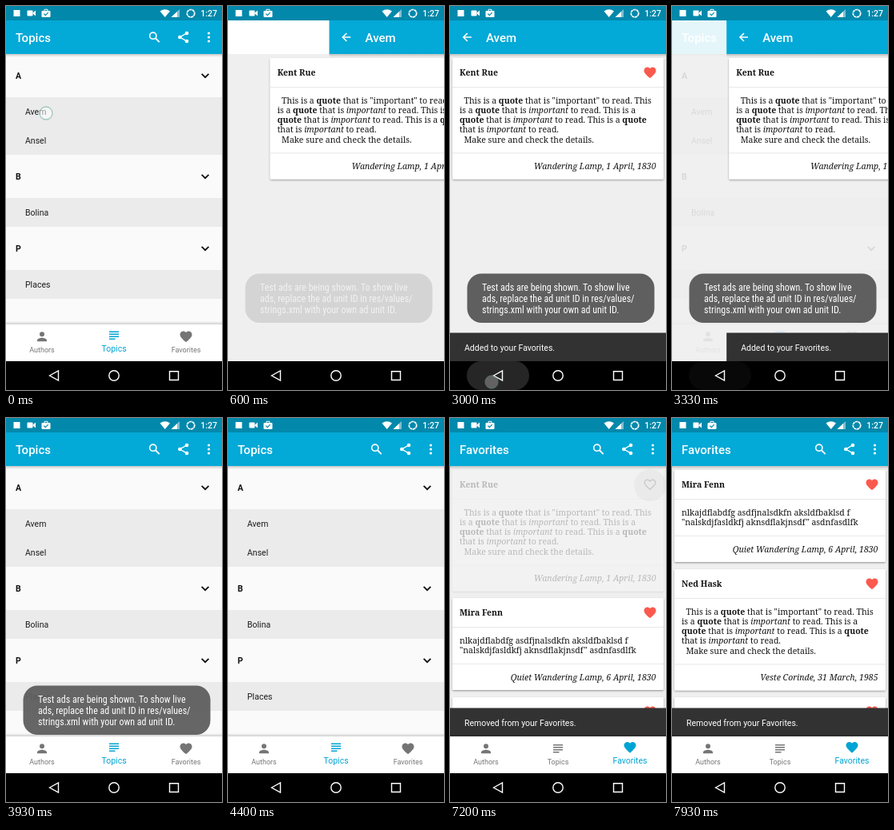
Animation, 270 px wide and 480 px high, one loop 8 s. Source, as an HTML page:

```html
<!DOCTYPE html>
<html lang="en">
<head>
<meta charset="utf-8">
<title>Quotes app</title>
<style>
html, body { margin: 0; width: 100%; height: 100%; overflow: hidden; background: #000; }
svg { display: block; width: 270px; height: 480px; }
text { font-family: Roboto, sans-serif; font-size: 10.5px; white-space: pre; }
.title { font-size: 15px; font-weight: 500; fill: #fff; }
.clock { font-weight: 500; fill: #fff; }
.serif { font-family: "Noto Serif", serif; fill: #151515; }
.bold { font-weight: 700; }
.ital { font-style: italic; }
.end { text-anchor: end; }
.mid { text-anchor: middle; }
.toast { font-family: "Roboto Condensed", Roboto, sans-serif; font-size: 12px; fill: #fff; }
.line { fill: none; stroke-linecap: square; }
</style>
</head>
<body>
<svg id="stage" viewBox="0 0 270 480" xmlns="http://www.w3.org/2000/svg"></svg>
<script>
const LOOP = 8000, BLUE = '#03a9d7', GREY = [117, 117, 117], ACTIVE = [0, 164, 212];
const HEART = 'M12 21.35l-1.45-1.32C5.4 15.36 2 12.28 2 8.5 2 5.42 4.42 3 7.5 3c1.74 0 3.41.81 4.5 2.09C13.09 3.81 14.76 3 16.5 3 19.58 3 22 5.42 22 8.5c0 3.78-3.4 6.86-8.55 11.54z';
const HOLLOW = HEART + 'M12.1 18.55l-.1.1-.1-.1C7.14 14.24 4 11.39 4 8.5 4 6.5 5.5 5 7.5 5c1.54 0 3.04.99 3.57 2.36h1.87C13.46 5.99 14.96 5 16.5 5c2 0 3.5 1.5 3.5 3.5 0 2.89-3.14 5.74-7.9 10.05z';
const PERSON = 'M12 12a4 4 0 1 0 0-8 4 4 0 0 0 0 8zm0 2c-2.67 0-8 1.34-8 4v2h16v-2c0-2.66-5.33-4-8-4z';
const SUBJECT = 'M14 17H4v2h10zM20 9H4v2h16zM4 15h16v-2H4zM4 5v2h16V5z';

// ---- markup helpers
const rect = (x, y, w, h, fill, more = '') => `<rect x="${x}" y="${y}" width="${w}" height="${h}" fill="${fill}" ${more}/>`;
const text = (x, y, s, cls = '', more = '') => `<text x="${x}" y="${y}" class="${cls}" ${more}>${s}</text>`;
const group = (id, body, more = '') => `<g id="${id}" ${more}>${body}</g>`;
const icon = (d, x, y, more = '') => `<path d="${d}" transform="translate(${x - 9} ${y - 9}) scale(.75)" ${more}/>`;
const stroke = (d, color, w) => `<path class="line" d="${d}" stroke="${color}" stroke-width="${w}"/>`;
const rich = s => s.replace(/\*(.+?)\*/g, '<tspan class="bold">$1</tspan>').replace(/_(.+?)_/g, '<tspan class="ital">$1</tspan>');

const QUOTE = [
  '  This is a *quote* that is "important" to read. This',
  'is a *quote* that is _important_ to read. This is a',
  '*quote* that is _important_ to read. This is a *quote*',
  'that is _important_ to read.',
  '  Make sure and check the details.'
];
const SCRIBBLE = ['nlkajdflabdfg asdfjnalsdkfn aksldfbaklsd f', '"nalskdjfasldkfj aknsdflakjnsdf" asdnfasdlfk'];

function card(id, y, name, lines, source) {
  const h = 90.5 + lines.length * 12.2, foot = y + h - 33;
  return group(id,
    rect(3, y, 264, h, '#fff', 'rx="1.5" filter="url(#lift)"') +
    rect(3, y + 36, 264, .8, '#e2e2e2') + rect(3, foot, 264, .8, '#e2e2e2') +
    text(12, y + 22, name, 'serif bold') +
    lines.map((s, i) => text(12, y + 56.5 + i * 12.25, rich(s), 'serif')).join('') +
    text(257.5, y + h - 12.3, source, 'serif ital end') +
    icon(HEART, 250, y + 18.3, 'class="full" fill="#fb594d"') +
    icon(HOLLOW, 250, y + 18.3, 'class="open" fill="#7d7d7d" fill-rule="evenodd"'));
}

const toolbar = rect(0, 18, 270, 42, BLUE) + rect(0, 60, 270, 4, 'url(#down)');

const actions =
  `<circle cx="183.8" cy="37.2" r="4.1" fill="none" stroke="#fff" stroke-width="1.6"/>` +
  stroke('M187.3 40.7L191 44.4', '#fff', 1.9) + stroke('M226 34L217.3 39L226 44', '#fff', 1.4) +
  [[217.3, 39], [226, 34], [226, 44]].map(([x, y]) => `<circle cx="${x}" cy="${y}" r="2.3" fill="#fff"/>`).join('') +
  [34, 39, 44].map(y => `<circle cx="253.5" cy="${y}" r="1.6" fill="#fff"/>`).join('');

const section = (y, s) => text(12, y + 31, s, 'bold', 'fill="#111"') + stroke(`M245.2 ${y + 25.4}l3.8 3.8l3.8 -3.8`, '#111', 1.7);
const row = (y, s) => rect(0, y, 270, 36, '#ebebeb') + text(24, y + 22, s, '', 'fill="#1c1c1c"');

const topics = rect(0, 60, 270, 340, '#fafafa') +
  section(60, 'A') + row(114, 'Avem') + row(150, 'Ansel') +
  section(186, 'B') + row(240, 'Bolina') + section(276, 'P') + row(330, 'Places') +
  `<g clip-path="url(#rowClip)"><circle id="rowRipple" cx="50" cy="134"/></g>`;

const favorites = rect(0, 60, 270, 340, '#efefef') +
  card('fav0', 65, 'Kent Rue', QUOTE, 'Wandering Lamp, 1 April, 1830') +
  group('rest',
    card('fav1', 225, 'Mira Fenn', SCRIBBLE, 'Quiet Wandering Lamp, 6 April, 1830') +
    card('fav2', 349, 'Ned Hask', QUOTE, 'Veste Corinde, 31 March, 1985') +
    card('fav3', 509, 'Ned Hask', QUOTE, 'Veste Corinde, 31 March, 1985')) +
  `<circle id="favRipple" cx="250" cy="84"/>` +
  rect(266.5, 60, 3.5, 306, '#b4b4b4', 'id="scroll"');

const snack = (id, y, s) => group(id, rect(0, y, 270, 36, '#323232') + text(18, y + 22, s, '', 'fill="#fff"'));

const TABS = [['Authors', PERSON, 45], ['Topics', SUBJECT, 135], ['Favorites', HEART, 225]];
const tabBar = rect(0, 394, 270, 4, 'url(#up)') + rect(0, 398, 270, 46, '#fff') +
  `<g clip-path="url(#tabClip)"><circle id="tabRipple" cx="226" cy="421"/></g>` +
  TABS.map(([s, d, x], i) => group('tab' + i, icon(d, x, 0) + text(x, 433, s, 'mid'))).join('');

const status = rect(0, 0, 270, 18, '#0288ab') + rect(9.5, 5, 8, 8, '#fff') +
  rect(26.5, 5.5, 7, 7, '#fff', 'rx="1"') + `<path d="M33 9l4-3.5v7z" fill="#fff"/>` +
  rect(44.5, 6, 11, 8, '#fff', 'rx="1"') + stroke('M48 6V4.3H52V6', '#fff', 1) + stroke('M47.6 10l1.7 1.7l3-3.2', '#0288ab', 1.1) +
  `<path d="M192.5 6.6Q198.7 2 205 6.6L198.7 14z" fill="#fff"/>` +
  `<path d="M206.5 14L217 4V14z" fill="#7fc1d3"/><path d="M206.5 14L214 6.9V14z" fill="#fff"/>` +
  `<circle cx="231" cy="9.2" r="4.7" fill="none" stroke="#fff" stroke-width="1.7" stroke-dasharray="3.4 .5"/>` +
  text(264, 13, '1:27', 'clock end');

const navBar = rect(0, 444, 270, 36, '#000') +
  rect(21, 444, 78, 36, '#262626', 'rx="18" id="navRipple"') +
  stroke('M54.5 462L65.5 456V468Z', '#fff', 1.4) +
  `<circle cx="135" cy="462" r="6.2" fill="none" stroke="#fff" stroke-width="1.4"/>` +
  stroke('M204.5 456.8H215.5V467.5H204.5Z', '#fff', 1.4);

const detail = group('detailBack', rect(0, 18, 270, 42, '#fff') + rect(0, 60, 270, 384, '#efefef')) +
  group('detailBody', card('quote', 65, 'Kent Rue', QUOTE, 'Wandering Lamp, 1 April, 1830') +
    `<circle id="likeRipple" cx="250" cy="84"/>`) +
  group('detailBar', toolbar + stroke('M26 39H17M21.2 34.6L16.8 39L21.2 43.4', '#fff', 1.6) + text(45, 45, 'Avem', 'title')) +
  snack('added', 408.5, 'Added to your Favorites.');

const toast = rect(21.5, 334.5, 234, 61.5, '#5f5f5f', 'rx="18"') +
  ['Test ads are being shown. To show live', 'ads, replace the ad unit ID in res/values/', 'strings.xml with your own ad unit ID.']
    .map((s, i) => text(40, 356 + i * 14, s, 'toast')).join('');

const fade = (id, a, b) => `<linearGradient id="${id}" x2="0" y2="1"><stop stop-color="#000" stop-opacity="${a}"/><stop offset="1" stop-color="#000" stop-opacity="${b}"/></linearGradient>`;
const clip = (id, ...r) => `<clipPath id="${id}">${rect(...r, '#000')}</clipPath>`;

const stage = document.getElementById('stage');
stage.innerHTML = `<defs>${fade('down', .2, 0)}${fade('up', 0, .17)}` +
  clip('rowClip', 0, 114, 270, 36) + clip('tabClip', 180, 398, 90, 46) + clip('appClip', 0, 18, 270, 426) +
  `<filter id="lift" x="-5%" y="-5%" width="110%" height="115%"><feDropShadow dx="0" dy="1.1" stdDeviation="1.3" flood-opacity=".38"/></filter></defs>` +
  `<g clip-path="url(#appClip)">` +
  group('topics', topics) + group('favorites', favorites) + toolbar + text(12, 45, 'Topics', 'title', 'id="heading"') + actions +
  snack('removed', 362.5, 'Removed from your Favorites.') + tabBar + group('detail', detail) + `</g>` +
  group('toast', toast) + status + navBar +
  `<circle id="touch" r="8" fill="#fff" fill-opacity=".55" stroke="#8cbcb4" stroke-opacity=".8" stroke-width="1.3"/>`;

// ---- motion
const $ = id => document.getElementById(id);
const set = (node, attrs) => { for (const k in attrs) node.setAttribute(k, attrs[k]); };
const show = (id, on) => $(id).style.display = on ? '' : 'none';
const ramp = (t, a, b) => Math.min(1, Math.max(0, (t - a) / (b - a)));
const out = p => 1 - (1 - p) ** 3;
const into = p => p * p;
const both = p => (1 - Math.cos(Math.PI * p)) / 2;
const move = (id, x, y) => set($(id), { transform: `translate(${x} ${y})` });
const alpha = (id, a) => set($(id), { opacity: a });

function ripple(id, t, start, grown, gone, r, strength) {
  set($(id), { r: r * out(ramp(t, start, grown)), 'fill-opacity': strength * (1 - ramp(t, gone - 200, gone)) });
}

function like(id, on) {
  $(id).querySelector('.full').style.display = on ? '' : 'none';
  $(id).querySelector('.open').style.display = on ? 'none' : '';
}

const TOUCHES = [ // x, y, from, to
  [50, 134, -100, 130], [250, 84, 1530, 1680], [52, 470, 2800, 3100], [224, 421, 4930, 5130], [249, 83, 6400, 6680]
];

function tab(i, p) {
  const g = $('tab' + i), x = TABS[i][2];
  set(g, { fill: `rgb(${GREY.map((c, k) => Math.round(c + (ACTIVE[k] - c) * p))})` });
  set(g.firstChild, { transform: `translate(${x - 9} ${404.3 - 1.6 * p}) scale(.75)` });
  set(g.lastChild, { y: 433 - .8 * p });
  g.lastChild.style.fontSize = 9 + 1.5 * p + 'px';
}

function draw(t) {
  const inFavs = t >= 5130;
  show('topics', !inFavs);
  show('favorites', inFavs);
  $('heading').textContent = inFavs ? 'Favorites' : 'Topics';
  const p = ramp(t, 5080, 5260);
  [0, 1 - p, p].forEach((v, i) => tab(i, v));

  ripple('rowRipple', t, 40, 450, 600, 230, .1);
  ripple('likeRipple', t, 1530, 1700, 1870, 20, .08);
  ripple('tabRipple', t, 4930, 5260, 5800, 46, .06);
  ripple('favRipple', t, 6400, 6650, 7330, 20, .05);

  // detail screen: backdrop fades, parts slide from the right
  show('detail', t > 400 && t < 3600);
  alpha('detailBack', ramp(t, 400, 600) * (1 - ramp(t, 3300, 3600)));
  const back = 270 * into(ramp(t, 3130, 3530));
  move('detailBody', 270 * (1 - out(ramp(t, 450, 800))) + back, 0);
  move('detailBar', 270 * (1 - out(ramp(t, 480, 1022))) + back, 0);
  like('quote', t >= 1600);
  move('added', back, 36 * (1 - out(ramp(t, 1600, 1870))));
  alpha('added', t >= 1600 ? 1 : 0);
  alpha('toast', ramp(t, 530, 920) * (1 - into(ramp(t, 3800, 4400))));
  alpha('navRipple', ramp(t, 2800, 2960) * (1 - ramp(t, 3080, 3400)));

  // favorites list
  alpha('scroll', 1 - ramp(t, 5480, 5730));
  like('fav0', t < 6600);
  alpha('fav0', 1 - ramp(t, 7110, 7230));
  move('rest', 0, -160 * both(ramp(t, 7250, 7600)));
  alpha('removed', t >= 6750 ? 1 : 0);
  move('removed', 0, 36 * (1 - out(ramp(t, 6750, 7050))));

  const hit = TOUCHES.find(([, , a, b]) => t >= a && t < b);
  show('touch', hit);
  if (hit) {
    const [x, y, a, b] = hit;
    set($('touch'), { cx: x, cy: y, opacity: ramp(t, a - 30, a + 50) * (1 - ramp(t, b - 70, b)) * (y > 444 ? .5 : 1) });
  }
}

['fav1', 'fav2', 'fav3'].forEach(id => like(id, true));
const begin = performance.now();
(function tick() {
  draw((performance.now() - begin) % LOOP);
  requestAnimationFrame(tick);
})();
</script>
</body>
</html>
```
